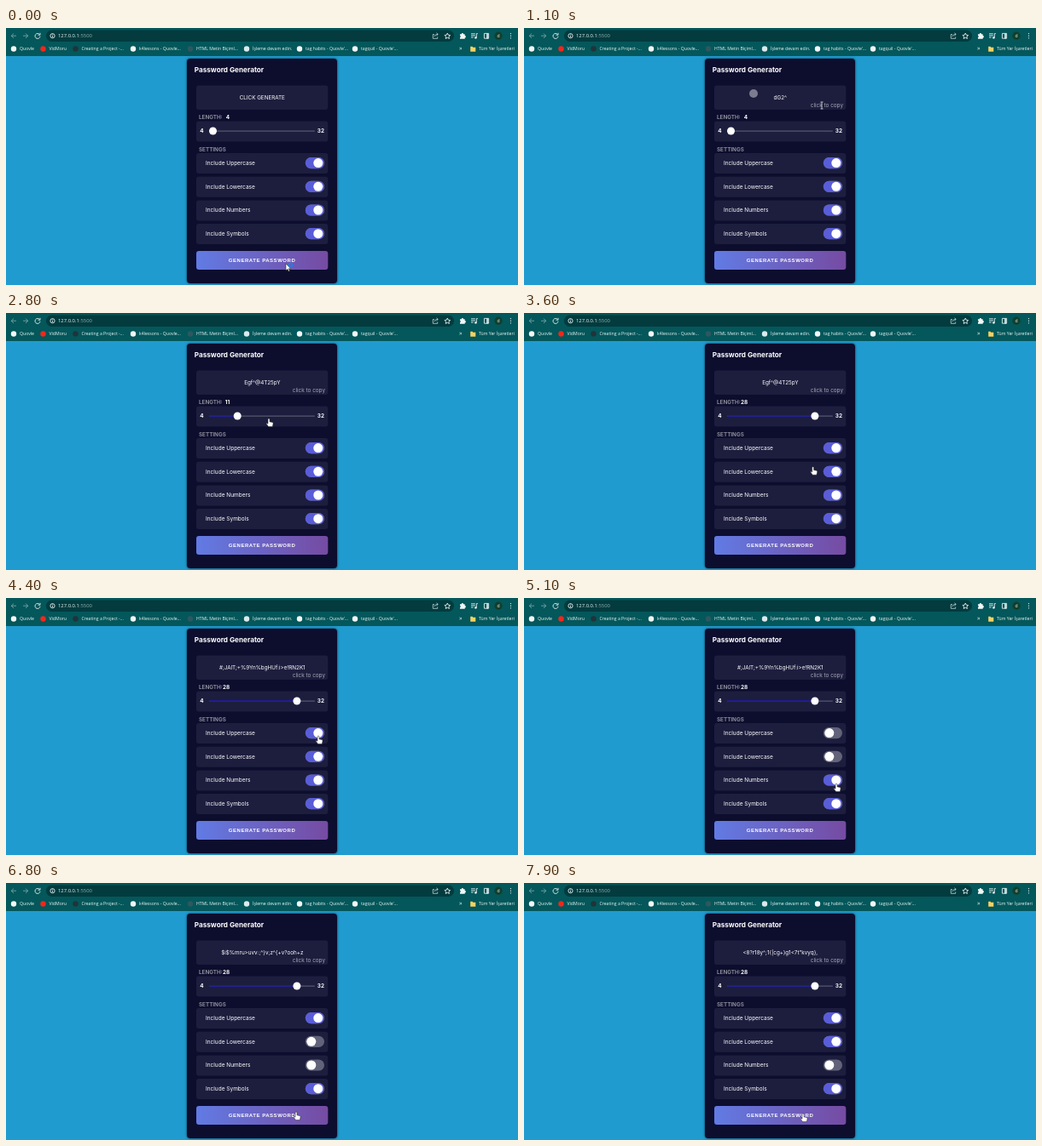
These frames come from a looping animation (600 by 302 pixels, 8000 ms). An HTML page:

```html
<!DOCTYPE html>
<html lang="tr">
<head>
<meta charset="utf-8">
<style>
  html, body { margin: 0; width: 100%; height: 100%; overflow: hidden; background: #209bcf; }
  svg { display: block; width: 100vw; height: 100vh; }
  text { font: 6.4px Inter, sans-serif; fill: #fff; white-space: pre; }
  .bold { font-weight: 700; }
  .title { font-size: 8.2px; }
  .label { font-size: 6.3px; fill: #8b8c98; }
  .bar text { font: 5.15px "Open Sans", sans-serif; fill: #edf5f5; }
  .bar .address { font-size: 5.9px; }
  .line { fill: none; stroke: #e4f0f0; stroke-width: .9; }
  .action { font: 700 6px "Liberation Sans", Arial, sans-serif; letter-spacing: .53px; }
  .box { fill: #1d1e3e; }
</style>
</head>
<body>
<svg viewBox="0 0 600 302" preserveAspectRatio="none">
  <defs>
    <linearGradient id="violet"><stop stop-color="#617be4"/><stop offset="1" stop-color="#764ba2"/></linearGradient>
    <filter id="shadow" x="-10%" y="-10%" width="120%" height="120%">
      <feDropShadow dx="0" dy="0" stdDeviation="1.5" flood-opacity=".65"/>
    </filter>
  </defs>
  <rect width="600" height="302" fill="#209bcf"/>

  <g class="bar">
    <rect width="600" height="33" fill="#04575a"/>
    <rect x="47" y="2.5" width="478" height="13.5" rx="6.7" fill="#033b3e"/>
    <path class="line" opacity=".5" d="M12 9.2H6.5M9 6.5 6.3 9.2 9 12M20 9.2h5.5M23 6.5l2.7 2.7L23 12"/>
    <path class="line" d="M39.3 7.5A3 3 0 1 0 40 9.8M40 5.8v2.4h-2.4"/>
    <circle class="line" cx="54.5" cy="9.2" r="2.6" stroke-width=".7"/>
    <path class="line" stroke-width=".7" d="M54.5 8.8v2M54.5 7.4v.7"/>
    <text class="address" x="61" y="11.3">127.0.0.1<tspan fill="#8db0b1">:5500</tspan></text>
    <path class="line" stroke-width=".7" opacity=".75" d="M502 7.5h-1.7v4.8h5.4v-1.8M502 10q.5-2.6 4-2.6M504.5 5.8l1.8 1.6-1.8 1.6"/>
    <path class="line" stroke-width=".7" d="M517.3 6l1 2.2 2.4.3-1.8 1.6.5 2.4-2.1-1.2-2.1 1.2.5-2.4-1.8-1.6 2.4-.3z"/>
    <path fill="#f2f7f7" d="M532 7.2h1.7a1.2 1.2 0 0 1 2.4 0h1.6v1.9a1.2 1.2 0 0 1 0 2.4v1.2H532v-1.7a1.2 1.2 0 0 0 0-2.2z"/>
    <path class="line" d="M545 6.8h4.8M545 8.9h4.8M545 11h2.7M551.3 11.3V6.6h1.6"/>
    <circle cx="550.4" cy="11.4" r="1.2" fill="#fff"/>
    <path class="line" d="M560.4 6.4h5.2v5.8h-5.2zM563.6 6.4v5.8h1V6.4"/>
    <circle cx="577" cy="9.2" r="4.6" fill="#123f2b"/>
    <text x="575.6" y="11">d</text>
    <path stroke="#f2f7f7" stroke-width="1.3" stroke-linecap="round" d="M591.5 6.6v0M591.5 9.2v0M591.5 11.8v0"/>
    <g id="bookmarks"></g>
    <text x="531" y="26.3" style="font-size:7px">»</text>
    <path fill="#f6d163" d="M544.2 21.8h2.3l.8.9h3v5h-6.1z"/>
    <text x="554" y="26.3">Tüm Yer İşaretleri</text>
  </g>

  <rect x="212" y="36" width="176" height="264" rx="4" fill="#0a0a2e" filter="url(#shadow)"/>
  <text class="bold title" x="220.7" y="51.8">Password Generator</text>

  <rect class="box" x="223" y="67.5" width="154.3" height="28.5" rx="3"/>
  <text id="password" x="300.3" y="83.6" text-anchor="middle" style="font-size:6.3px"></text>
  <text id="hint" x="374" y="92.6" text-anchor="end" opacity=".6">click to copy</text>
  <circle id="bubble" fill="#7b7c8d"/>

  <text class="bold label" x="226" y="106.9">LENGTH:</text>
  <text class="bold" id="length" x="262.2" y="106.9" text-anchor="end"></text>
  <rect class="box" x="223" y="109.5" width="154.3" height="24" rx="3"/>
  <text class="bold" x="227.3" y="123.4">4</text>
  <text class="bold" x="373" y="123.4" text-anchor="end">32</text>
  <rect x="238" y="120.4" width="124" height="1.3" rx=".6" fill="#56576e"/>
  <rect id="fill" x="238" y="120.3" height="1.5" rx=".7" fill="#17139c"/>
  <circle id="thumb" cy="121" r="4.5" fill="#fff"/>

  <text class="bold label" x="226" y="144.7">SETTINGS</text>
  <g id="rows"></g>

  <rect x="223" y="262" width="154.3" height="22" rx="3" fill="url(#violet)"/>
  <text class="action" x="260.8" y="275.2">GENERATE PASSWORD</text>

  <g id="cursor">
    <path id="hand" fill="#fff" stroke="#222" stroke-width=".5" d="M0 0Q1 0 1 1V3.8L4.2 4.5Q5.3 4.8 5.1 6L4.3 9.6H-.4L-2.9 6.2Q-2.6 4.8-1 6.2V1Q-1 0 0 0z"/>
    <path id="arrow" fill="#fff" stroke="#222" stroke-width=".5" d="M0 0V8L1.9 6.3 3.1 9 4.4 8.4 3.2 5.8H5.8z"/>
    <path id="beam" fill="none" stroke="#ddd" stroke-width=".8" d="M-1.5-4H1.5M0-4V4M-1.5 4H1.5"/>
    <circle id="busy" cx="5.4" cy="1.6" r="2.3" fill="none" stroke="#1d83e8" stroke-width="1.3"/>
  </g>
</svg>
<script>
const LOOP = 8000;
const $ = id => document.getElementById(id);
const set = (el, attrs) => { for (const k in attrs) el.setAttribute(k, attrs[k]); };
const clamp = v => Math.max(0, Math.min(1, v));
const smooth = v => { v = clamp(v); return v * v * (3 - 2 * v); };

const bookmarks = [
  [9, '#f4f6f6', 'Quovle'],
  [43.5, '#f2271c', 'VidMoru'],
  [81.5, '#20343a', 'Creating a Project -...'],
  [149, '#f4f6f6', 'k4lessons - Quovle...'],
  [216, '#2d5860', 'HTML Metin Biçiml...'],
  [282, '#dbe9ec', 'İşleme devam edin.'],
  [344, '#f4f6f6', "tag habits - Quovle'..."],
  [409, '#f4f6f6', "tagquil - Quovle'..."],
];
$('bookmarks').innerHTML = bookmarks.map(([x, color, name]) =>
  `<circle cx="${x}" cy="24.5" r="3.2" fill="${color}"/><text x="${x + 7}" y="26.3">${name}</text>`).join('');

const rowTop = i => 147 + i * 27.7;
$('rows').innerHTML = ['Uppercase', 'Lowercase', 'Numbers', 'Symbols'].map((name, i) => `
  <g transform="translate(0 ${rowTop(i)})">
    <rect class="box" x="223" width="154.3" height="24" rx="3"/>
    <text x="234" y="13.9" style="font-size:6.5px">Include ${name}</text>
    <g class="toggle">
      <rect x="350.8" y="5" width="22.2" height="13.2" rx="6.6" fill="#62637a"/>
      <rect x="350.8" y="5" width="22.2" height="13.2" rx="6.6" fill="#5a5dd8"/>
      <circle cy="11.6" r="5.5" fill="#fff"/>
    </g>
  </g>`).join('');
const toggles = [...document.querySelectorAll('.toggle')];

// [start, text]
const passwords = [
  [0, 'CLICK GENERATE'],
  [300, 'dG2^'],
  [2450, 'Egf^@4T25pY'],
  [3900, '#;JAlT;+%9Yn%bgHUf:i>e!RN2K1'],
  [5700, '.<{+_!*;:+.;#~+*;,&%:;>:+{>{'],
  [6700, '$i$%mru>uvv:;^}v;z^{+v?ooh+z'],
  [7550, 'k7;(w^2q+}u4:z<9tr!m1>y?8{d,'],
  [7750, '<8?r18y^;1{|cg+)g1<7t"kvyq},'],
];

// [time, x, y] of the pointer tip
const path = [
  [0, 328, 277], [300, 328, 277], [900, 342, 86], [1100, 349, 91], [1300, 332, 88],
  [1600, 243, 121], [2050, 271, 121], [2350, 320, 271], [2500, 320, 271],
  [2800, 308, 124], [3000, 271, 121], [3450, 341, 121], [3800, 335, 271], [3950, 335, 271],
  [4350, 366, 162], [4500, 366, 162], [4750, 366, 190], [4850, 366, 190],
  [5100, 366, 218], [5200, 366, 218], [5600, 332, 270], [6000, 332, 270],
  [6300, 366, 162], [6400, 366, 162], [6650, 340, 269], [6800, 340, 269],
  [7150, 366, 190], [7250, 366, 190], [7500, 327, 271], [8000, 327, 271],
];

function pointerAt(t) {
  const i = path.findIndex(p => p[0] > t);
  const [a, b] = [path[i - 1], path[i]];
  const k = smooth((t - a[0]) / (b[0] - a[0]));
  return [a[1] + (b[1] - a[1]) * k, a[2] + (b[2] - a[2]) * k];
}

function pointerKind(x, y, t) {
  if (t < 300) return 'arrow';
  if (y > 67 && y < 96) return 'beam';
  const overSlider = y > 115 && y < 128;
  const overRow = [0, 1, 2, 3].some(i => y > rowTop(i) && y < rowTop(i) + 24);
  return overSlider || overRow || y > 262 ? 'hand' : 'arrow';
}

// Toggle state 0..1, flipping at the given times
const toggleFlips = [[4480, 6350], [4800, 7200], [5150], []];
const toggleAt = (flips, t) =>
  flips.reduce((v, at, i) => v + (i % 2 ? 1 : -1) * smooth((t - at) / 180), 1);

function draw(t) {
  $('password').textContent = passwords.findLast(p => p[0] <= t)[1];
  $('hint').style.display = t < 300 ? 'none' : '';

  const value = Math.round(4 + 7 * smooth((t - 1600) / 450) + 17 * smooth((t - 3000) / 450));
  $('length').textContent = value;
  set($('fill'), { width: (value - 4) / 28 * 124 });
  set($('thumb'), { cx: 242.5 + (value - 4) * 4.1 });

  toggles.forEach((el, i) => {
    const locked = i === 3 && t >= 5150 && t < 6350;
    const on = toggleAt(toggleFlips[i], t);
    set(el.children[1], { opacity: locked ? 0 : on });
    set(el.children[2], { cx: 357.8 + 8 * on });
    set(el, { opacity: locked ? .55 : 1 });
  });

  const [x, y] = pointerAt(t);
  const kind = pointerKind(x, y, t);
  set($('cursor'), { transform: `translate(${x} ${y})` });
  for (const id of ['hand', 'arrow', 'beam']) $(id).style.display = id === kind ? '' : 'none';
  $('busy').style.display = t < 300 ? '' : 'none';
  set($('bubble'), { cx: x - 80, cy: y - 14, r: 5 * clamp(Math.min((t - 800) / 200, (1500 - t) / 200)) });
}

const start = performance.now();
function tick() {
  draw((performance.now() - start) % LOOP);
  requestAnimationFrame(tick);
}
tick();
</script>
</body>
</html>
```
